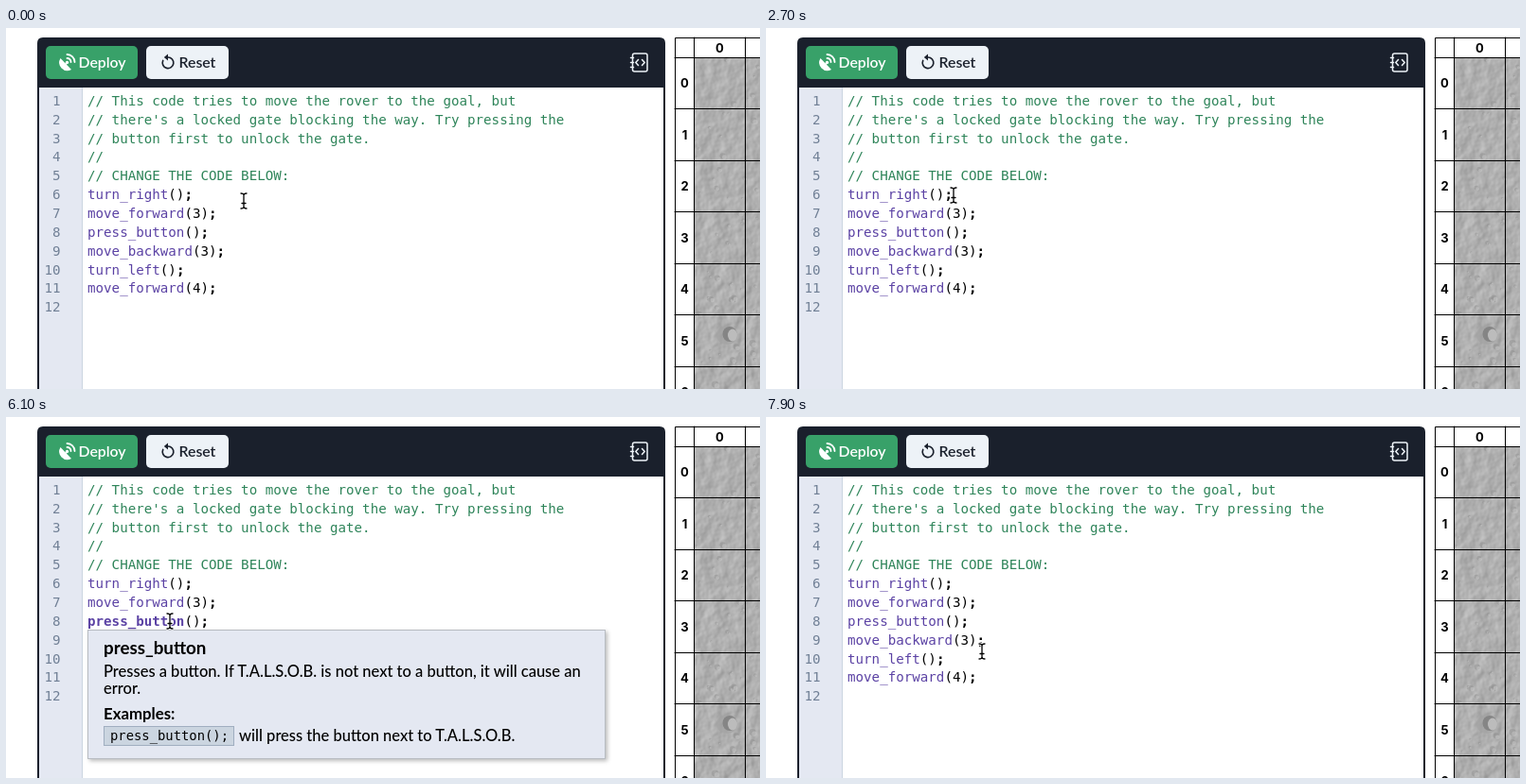
An HTML page for the animation above (8000 ms loop, 796 by 382 pixels).

```html
<!DOCTYPE html>
<html lang="en">
<head>
<meta charset="utf-8">
<title>Code editor hover hints</title>
<style>
html, body { margin: 0; width: 100%; height: 100%; overflow: hidden; background: #fff; }
svg { display: block; }
text { font: 500 16.5px Lato, "Open Sans", sans-serif; white-space: pre; }
.btn { font-size: 15.8px; font-weight: 600; }
.title { font-size: 18.8px; font-weight: 700; }
.head { font-size: 16.8px; font-weight: 700; }
.code, .chip { font: 14.18px "DejaVu Sans Mono", monospace; }
.chip { font-size: 13.85px; }
.num { fill: #718096; text-anchor: end; }
.note { fill: #2f855a; }
.call { fill: #5b42a4; }
.semi { font-weight: 700; }
.axis { font: 700 13px Inter, sans-serif; text-anchor: middle; }
.hint { filter: drop-shadow(2px 2px 2px #0004); }
.line { fill: none; stroke-linecap: round; stroke-linejoin: round; }
</style>
</head>
<body>
<svg width="796" height="382" viewBox="0 0 796 382">
  <defs>
    <filter id="moon" x="0" y="0" width="1" height="1" color-interpolation-filters="sRGB">
      <feTurbulence type="fractalNoise" baseFrequency=".07" numOctaves="3" seed="8"/>
      <feDiffuseLighting surfaceScale=".6" diffuseConstant="1" lighting-color="#f8f8f8">
        <feDistantLight azimuth="205" elevation="45"/>
      </feDiffuseLighting>
    </filter>
    <path id="beam" d="M-3-8Q0-8 0-6Q0-8 3-8M0-6V6M-3 8Q0 8 0 6Q0 8 3 8M-2 2.500H2"/>
  </defs>

  <path d="M33 382V16q0-6 6-6H690q6 0 6 6V382z" fill="#1a202c"/>
  <path d="M35 63H694V382H35z" fill="#fff"/>
  <path d="M35 63H80V382H35z" fill="#e4e8f2"/>
  <path d="M80.500 63V382" stroke="#cbd5e0"/>

  <rect x="42" y="19" width="97" height="35" rx="5" fill="#38a169"/>
  <g fill="#fff">
    <path d="M57.500 32a8.600 8.600 0 0 0 11.500 12z"/>
    <circle cx="64.500" cy="36.500" r="1.700"/>
    <path class="line" d="M62 39.500l2.500-3M64.500 28a8 8 0 0 1 8 8M64.500 32a4 4 0 0 1 4 4" stroke="#fff" stroke-width="1.800"/>
    <text class="btn" x="76.500" y="41.500">Deploy</text>
  </g>

  <rect x="148" y="19" width="87" height="35" rx="5" fill="#edf2f7"/>
  <path class="line" d="M165.700 34.500a5.800 5.800 0 1 0 5.300-3.500h-2" stroke="#1a202c" stroke-width="1.700"/>
  <path d="M171 27.500v7l-4.200-3.500z" fill="#1a202c"/>
  <text class="btn" x="182.500" y="41.500" fill="#1a202c">Reset</text>

  <g class="line" stroke="#edf2f7" stroke-width="1.500">
    <rect x="661.500" y="27" width="15.500" height="19" rx="2"/>
    <path d="M659.500 31.500h3M659.500 36.500h3M659.500 41.500h3M667.500 33.500l-2.700 3 2.700 3M671.500 33.500l2.700 3-2.700 3"/>
  </g>

  <g id="code"></g>

  <rect x="726" y="31" width="70" height="351" filter="url(#moon)"/>
  <g id="pits"></g>
  <ellipse cx="761" cy="325" rx="11" ry="10" fill="#a2a2a2" opacity=".7"/>
  <ellipse cx="764" cy="324" rx="7.500" ry="8" fill="#858585"/>
  <ellipse cx="767" cy="325" rx="5" ry="6.500" fill="#bcbcbc"/>
  <g id="grid"></g>
  <g id="hints"></g>

  <g id="cursor" class="line">
    <use href="#beam" stroke="#fff" stroke-width="3"/>
    <use href="#beam" stroke="#000" stroke-width="1.300"/>
  </g>
</svg>
<script>
const $ = id => document.getElementById(id);
const text = (cls, x, y, body) => `<text class="${cls}" x="${x}" y="${y}">${body}</text>`;

const lines = [
  '// This code tries to move the rover to the goal, but',
  "// there's a locked gate blocking the way. Try pressing the",
  '// button first to unlock the gate.',
  '//',
  '// CHANGE THE CODE BELOW:',
  'turn_right();',
  'move_forward(3);',
  'press_button();',
  'move_backward(3);',
  'turn_left();',
  'move_forward(4);',
  ''
];

const paint = line => line.startsWith('//')
  ? `<tspan class="note">${line}</tspan>`
  : line.replace(/^(\w+)(.*);$/, '<tspan class="call">$1</tspan>$2<tspan class="semi">;</tspan>');

$('code').innerHTML = lines.map((line, i) => {
  const y = Math.round(81.9 + i * 19.85);
  return text('code num', 57.5, y, i + 1) + text('code', 86, y, paint(line));
}).join('');

// Small pits scattered over the lunar ground
let seed = 7;
const random = () => (seed = seed * 16807 % 2147483647) / 2147483647;
let pits = '';
for (let i = 0; i < 70; i++) {
  const x = 727 + random() * 69, y = 32 + random() * 350, r = 1 + random() ** 3 * 2.5;
  pits += `<circle cx="${x}" cy="${y}" r="${r}" fill="#909090" opacity=".5"/>
    <circle cx="${x + r * .6}" cy="${y + r * .5}" r="${r * .8}" fill="#c4c4c4" opacity=".6"/>`;
}
$('pits').innerHTML = pits;

// Map grid with row and column labels
let rules = 'M706.500 382V10.500H796M726.500 10V382M780.500 10V382';
let labels = text('axis', 753.5, 26, 0);
for (let row = 0; row < 7; row++) {
  const y = 31 + row * 54.5;
  rules += `M706 ${Math.floor(y) + .5}H796`;
  labels += text('axis', 716.5, y + 32, row);
}
$('grid').innerHTML = `<path class="line" d="${rules}" stroke="#000"/>${labels}`;

const hints = [
  { name: 'turn_right', word: 5, y: 185, width: 438, chip: 121, bold: 800, from: 800, to: 2600,
    about: ['Turn T.A.L.S.O.B. 90 degrees to the right (i.e., clockwise).'],
    example: 'will turn T.A.L.S.O.B. to the right.' },
  { name: 'press_button', word: 7, y: 225, width: 546, chip: 138, bold: 4100, from: 4200, to: 7200,
    about: ['Presses a button. If T.A.L.S.O.B. is not next to a button, it will cause an', 'error.'],
    example: 'will press the button next to T.A.L.S.O.B.' }
];

$('hints').innerHTML = hints.map(h => {
  const low = h.y + (h.about.length - 1) * 18.5;
  return `<g class="hint">
    <rect x="86.500" y="${h.y + .5}" width="${h.width}" height="${Math.round(low - h.y + 117)}" fill="#e4e8f2" stroke="#b8bcc2"/>
    ${text('title', 103, h.y + 26, h.name)}
    ${h.about.map((s, i) => text('', 103, h.y + 49.5 + i * 18, s)).join('')}
    ${text('head', 103, low + 76.5, 'Examples:')}
    <rect x="103.500" y="${Math.floor(low + 84) + .5}" width="${h.chip - 1}" height="20" fill="#cbd5e0" stroke="#a0aec0"/>
    ${text('chip', 110, low + 98.5, h.name + '();')}
    ${text('', 108 + h.chip, low + 99.5, h.example)}
  </g>`;
}).join('');

hints.forEach((h, i) => {
  h.box = $('hints').children[i];
  h.call = $('code').children[h.word * 2 + 1].querySelector('.call');
});

// Pointer stops: time, x, y
const path = [
  [0, 251, 183], [100, 244, 130], [200, 215, 63], [300, 168, 150], [400, 138, 228],
  [600, 157, 179], [2400, 157, 179], [2700, 198, 177], [3000, 228, 188], [3300, 206, 208],
  [3800, 173, 216], [6900, 173, 216], [7100, 187, 216], [7400, 222, 224],
  [7800, 239, 246], [7900, 228, 248]
];

function pointer(t) {
  const i = path.findIndex(p => p[0] >= t);
  if (i < 1) return path[0].slice(1);
  const [a, b] = [path[i - 1], path[i]];
  const k = (t - a[0]) / (b[0] - a[0]);
  return [1, 2].map(n => a[n] + (b[n] - a[n]) * k);
}

function draw(now) {
  const t = Math.floor(now % 8000 / 100) * 100;
  $('cursor').setAttribute('transform', `translate(${pointer(t)})`);
  for (const h of hints) {
    h.box.style.display = t >= h.from && t < h.to ? '' : 'none';
    h.call.style.fontWeight = t >= h.bold && t < h.to ? 700 : 400;
  }
  requestAnimationFrame(draw);
}
draw(performance.now());
</script>
</body>
</html>
```
